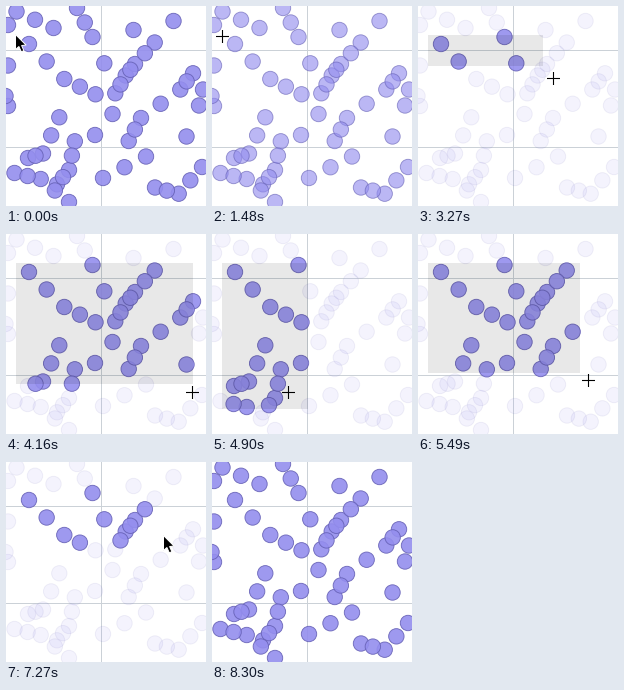
These frames come from a looping animation (200x200 px, 8.63 s). A matplotlib script:

```python
import numpy as np
import matplotlib.pyplot as plt
from matplotlib.animation import FuncAnimation
from matplotlib.patches import Polygon, Rectangle

SIZE, DPI = 200, 100
LOOP_MS, TICK_MS = 8630, 10
STEP_MS, LEAD_MS = 148.2, 5
PX = 72 / DPI

ORIGIN = np.array([10, 29])
FULL, DIM = 0.9, 0.1
FILL = np.array([148, 142, 238]) / 255
EDGE = np.array([102, 97, 182]) / 255
PRESS, RELEASE, RESET, LEAVE = 10, 48, 52, 56


def strand(*keys):
    """Dots at the key points and halfway between neighbours."""
    keys = np.array(keys, float)
    return np.vstack([keys, (keys[:-1] + keys[1:]) / 2])


POINTS = np.vstack([
    strand((23, 38), (58.3, 73), (89.5, 88.3)),
    strand((109.3, 87.3), (119.7, 69.5), (129, 58), (148.7, 36.5)),
    strand((187, 67.3), (174.3, 83.5), (135, 112), (122.7, 135)),
    strand((68.8, 135.3), (63, 164), (51, 178.3)),
    strand((8.5, 167), (34.7, 173), (63, 196)),
    strand((53.3, 111.3), (37, 147.5), (22, 152)),
    strand((196, 161), (172.7, 187.7), (149, 181.5)),
    strand((140, 150.5), (97, 172)),
    strand((86.5, 31), (71, 2)),
    strand((10.5, 5.5), (47.5, 22)),
    strand((2, 19), (2, 100)),
    [(98.3, 57.3), (106.5, 108), (89, 129), (180.5, 130.5), (127.5, 24),
     (167.5, 15), (197, 83.5), (193, 99.5), (-0.5, 90)],
])

# Key points of the drag: step -> pointer position
DRAG = {10: (10, 30), 14: (50, 50), 15: (52, 52), 18: (120, 54), 20: (120, 54),
        27: (187.3, 150), 28: (186, 158), 31: (125, 189), 33: (76, 158),
        36: (162, 139), 37: (170, 146), 39: (172, 179), 41: (113, 144),
        42: (110, 131), 45: (143, 83)}
DRAG_STEPS = np.array(list(DRAG), float)
DRAG_POS = np.array(list(DRAG.values()), float)
DRAG_VEL = np.gradient(DRAG_POS, DRAG_STEPS, axis=0)

ARROW = np.array([(0, 0), (0, 15), (3.4, 12), (5.8, 17.3), (8.4, 16.2),
                  (6.1, 11), (10.6, 10.6)])

fig = plt.figure(figsize=(SIZE / DPI, SIZE / DPI), dpi=DPI, facecolor="white")
ax = fig.add_axes([0, 0, 1, 1])
ax.set(xlim=(0, SIZE), ylim=(SIZE, 0))
ax.axis("off")

grid = dict(color="#cbd1d7", lw=PX, zorder=1)
ax.axvline(95.1, **grid)
for y in (44.1, 141.1):
    ax.axhline(y, **grid)

dots = ax.scatter(*POINTS.T, s=(15.4 * PX) ** 2, linewidths=0.9 * PX, zorder=2)
brush = ax.add_patch(Rectangle(ORIGIN, 0, 0, fc="black", ec="none", alpha=0.09, zorder=3))
cross, = ax.plot([], [], color="black", lw=1.1 * PX, zorder=4,
                 solid_capstyle="butt", snap=False)
arrow = ax.add_patch(Polygon(ARROW, fc="black", ec="white", lw=PX, zorder=4))


def drag_at(step):
    """Smooth (cubic Hermite) path through the drag key points."""
    step = np.clip(step, DRAG_STEPS[0], DRAG_STEPS[-1])
    i = min(np.searchsorted(DRAG_STEPS, step, "right"), len(DRAG_STEPS) - 1) - 1
    span = DRAG_STEPS[i + 1] - DRAG_STEPS[i]
    t = (step - DRAG_STEPS[i]) / span
    ease = t * t * (3 - 2 * t)
    return (DRAG_POS[i] * (1 - ease) + DRAG_POS[i + 1] * ease
            + span * t * (1 - t) * (DRAG_VEL[i] * (1 - t) - DRAG_VEL[i + 1] * t))


def pointer(step):
    """Return the pointer kind and its position."""
    if step < 2:
        return "arrow", (9, 28)
    if step < RELEASE:
        return "cross", drag_at(step)
    if step < LEAVE:
        return "arrow", (150 if step == RELEASE else 157, 73)
    return "none", (0, 0)


def fade(step):
    """Opacity of dots outside the selection."""
    down = np.clip((step - PRESS + 1) / 3, 0, 1)
    up = np.clip((step - RESET + 1) / 4, 0, 1)
    return FULL + (DIM - FULL) * (down - up)


def rgba(color, alpha):
    return np.column_stack([np.tile(color, (len(alpha), 1)), alpha])


def update(frame):
    step = int((frame * TICK_MS + LEAD_MS) / STEP_MS)

    # The brush trails the pointer by one step.
    corner = drag_at(step - 1)
    selected = ((POINTS >= ORIGIN) & (POINTS <= corner)).all(axis=1)
    alpha = np.where(selected, FULL, fade(step))
    dots.set_facecolor(rgba(FILL, alpha))
    dots.set_edgecolor(rgba(EDGE, alpha))

    brush.set_visible(PRESS < step < RELEASE)
    width, height = corner - ORIGIN
    brush.set_width(width)
    brush.set_height(height)

    kind, position = pointer(step)
    x, y = np.floor(position) + 0.5
    cross.set_visible(kind == "cross")
    cross.set_data([x - 6.5, x + 6.5, np.nan, x, x], [y, y, np.nan, y - 6.5, y + 6.5])
    arrow.set_visible(kind == "arrow")
    arrow.set_xy(ARROW + (x, y))
    return dots, brush, cross, arrow


anim = FuncAnimation(fig, update, frames=LOOP_MS // TICK_MS, interval=TICK_MS,
                     repeat=True, repeat_delay=0, blit=False)
plt.show()
```
